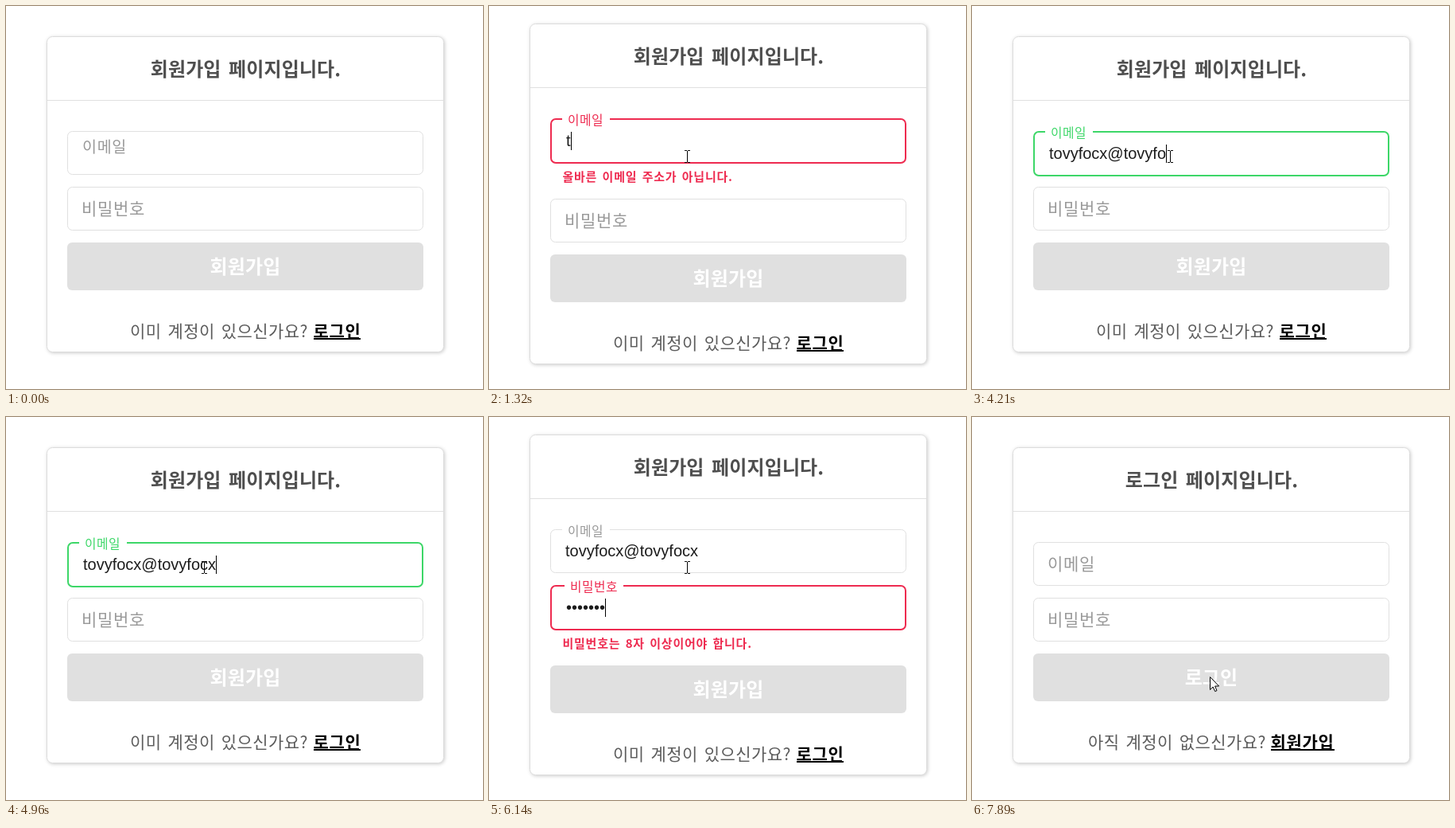
Animation of 600x481 px, one loop 8000 ms. Source, as an HTML page:

```html
<!DOCTYPE html>
<html lang="ko">
<head>
<meta charset="utf-8">
<title>회원가입</title>
<style>
  html, body { margin: 0; width: 100%; height: 100%; overflow: hidden; background: #fff; }
  svg { display: block; width: 100%; height: 100%; }
  text { font-family: "Noto Sans CJK KR", "Noto Sans KR", "Noto Sans CJK JP", "Noto Sans CJK", sans-serif; white-space: pre; }
  .card { fill: #fff; stroke: #dcdcdc; filter: drop-shadow(1px 1px 2px rgba(0, 0, 0, .2)); }
  .big { font-size: 24px; font-weight: 700; letter-spacing: .15px; word-spacing: 2.5px; text-anchor: middle; }
  .mid { font-size: 21px; font-weight: 300; letter-spacing: .7px; word-spacing: 1.6px; fill: #5c5c5c; }
  .ask { letter-spacing: .45px; }
  .link { font-weight: 700; fill: #000; }
  .error { font-size: 15px; font-weight: 700; letter-spacing: .75px; word-spacing: 1.5px; fill: #ee2b50; }
  .value { font: 20px "Liberation Sans", Arial, sans-serif; fill: #1c1c1c; }
  .field { --tone: #e0e0e0; --ink: #999; }
  .box { fill: none; stroke: var(--tone); }
  .label { fill: var(--ink); }
  .notch { fill: #fff; }
  .caret { fill: #000; }
  .good { --tone: #3dd768; --ink: #3dd768; }
  .bad { --tone: #ee2b50; --ink: #ee2b50; }
  .popup rect { fill: #fff; filter: drop-shadow(0 1px 2px rgba(0, 0, 0, .3)); }
  .popup text { font-size: 16.5px; font-weight: 300; letter-spacing: .2px; word-spacing: 1.4px; fill: #4c4c4c; }
</style>
</head>
<body>
<svg viewBox="0 0 600 481">
  <rect class="card" id="card" x="51.5" width="499" rx="7"/>
  <g id="head">
    <text class="big" id="title" x="301.5" y="87.5" fill="#4e4e4e"></text>
    <path d="M52 118.5H550" stroke="#e0e0e0"/>
  </g>
  <g class="field" id="email"></g>
  <g class="field" id="password"></g>
  <g id="foot">
    <rect id="button" x="77" y="297" width="448" height="60" rx="6"/>
    <text class="big" id="action" x="301" y="335.5" fill="#fff"></text>
    <text class="mid ask" id="ask" y="415.5"></text>
    <text class="mid link" id="link" y="415.5"></text>
    <path id="underline" stroke="#000" stroke-width="2"/>
  </g>
  <g class="popup" id="popup">
    <rect x="203" y="294" width="341" height="57" rx="5"/>
    <circle cx="228" cy="322" r="10" fill="#4285f4"/>
    <text x="251.5" y="328">Quobel 계정에 저장된 비밀번호 사용</text>
  </g>
  <path id="beam" d="M246 181.5H249M250 181.5H253M249.5 182V196M246 196.5H249M250 196.5H253" fill="none" stroke="#000"/>
  <path id="arrow" d="M.5.5V16.5L4.2 13 6.7 18.6 9 17.6 6.6 12H11.6Z" fill="#fff" stroke="#000"/>
</svg>
<script>
const LOOP = 8000;
const ADDRESS = 'tovyfocx@tovyfocx';
const FOCUS_PW = 5010, SUBMIT = 7620, POINTER = 7120;

const $ = id => document.getElementById(id);
const clamp = v => Math.max(0, Math.min(1, v));
const every = (start, gap, count) => Array.from({ length: count }, (_, i) => start + gap * i);
const set = (el, attrs) => { for (const k in attrs) el.setAttribute(k, attrs[k]); };
const show = (el, on) => { el.style.display = on ? '' : 'none'; };
const shift = (id, x, y) => set($(id), { transform: `translate(${x} ${y})` });

// keystroke times
const emailKeys = [...every(1310, 127, 8), 2550, ...every(3510, 138, 6), 4620, 4750];
const pwKeys = [5320, 5455, 5575, ...every(5710, 140, 5)];

const pages = {
  join: { title: '회원가입 페이지입니다.', action: '회원가입', ask: '이미 계정이 있으신가요?', link: '로그인', x: 156, from: 387, to: 446 },
  login: { title: '로그인 페이지입니다.', action: '로그인', ask: '아직 계정이 없으신가요?', link: '회원가입', x: 146, from: 376, to: 456 }
};

function makeField(id, name, floatX, notchWidth, message) {
  const root = $(id);
  root.innerHTML = `
    <rect class="box" rx="6"/>
    <g class="float">
      <rect class="notch" x="-9.3" y="-12" width="${notchWidth / .75}" height="24"/>
      <text class="mid label" y="7.5">${name}</text>
    </g>
    <text class="value"></text>
    <rect class="caret" y="17" width="1" height="23"/>
    <text class="error" x="92.5" y="79">${message}</text>`;
  const [box, float, value, caret, error] =
    ['.box', '.float', '.value', '.caret', '.error'].map(s => root.querySelector(s));

  return ({ y, text, focus, bad, lift, blink }) => {
    root.setAttribute('transform', `translate(0 ${y})`);
    root.setAttribute('class', 'field ' + (focus ? bad ? 'bad' : 'good' : ''));
    const w = focus ? 2 : 1;
    set(box, { x: 77 + w / 2, y: w / 2, width: 448 - w, height: 53 + w, 'stroke-width': w });
    const x = 95 + (floatX - 95) * lift;
    set(float, { transform: `translate(${x} ${27.5 - 25.5 * lift}) scale(${1 - lift / 4})` });
    value.textContent = text;
    set(value, { x: 95 + w, y: 33 + w });
    set(caret, { x: Math.round(97 + (text ? value.getComputedTextLength() : 0)) });
    show(caret, focus && blink);
    show(error, bad);
  };
}

const drawEmail = makeField('email', '이메일', 99, 60, '올바른 이메일 주소가 아닙니다.');
const drawPassword = makeField('password', '비밀번호', 102, 74, '비밀번호는 8자 이상이어야 합니다.');

// pointer positions as [time, x, y]
const route = [[POINTER, 262, 222], [7250, 290, 287], [7400, 290, 287], [7500, 299, 326]];

function pointerAt(t) {
  const next = route.findIndex(p => p[0] > t);
  if (next < 0) return route[route.length - 1].slice(1);
  if (next === 0) return route[0].slice(1);
  const a = route[next - 1], b = route[next], k = (t - a[0]) / (b[0] - a[0]);
  return [1, 2].map(i => a[i] + (b[i] - a[i]) * k);
}

function drawPage(page) {
  for (const id of ['title', 'action', 'ask', 'link']) $(id).textContent = page[id];
  set($('ask'), { x: page.x });
  set($('link'), { x: page.from - .5 });
  set($('underline'), { d: `M${page.from} 418H${page.to}` });
}

function render(t) {
  const done = t >= SUBMIT;
  const onPw = t >= FOCUS_PW && !done;
  const typed = keys => done ? 0 : keys.filter(k => k <= t).length;
  const emailLen = typed(emailKeys), pwLen = typed(pwKeys);
  const emailBad = emailLen > 0 && emailLen < 10;
  const pwBad = pwLen > 0 && pwLen < 8;
  const wide = emailBad || pwBad;
  const up = wide ? -16 : 0, down = wide ? 15 : 0;
  const lastKey = Math.max(0, ...[...emailKeys, FOCUS_PW, ...pwKeys].filter(k => k <= t));
  const blink = (t - lastKey) % 1000 < 500;
  const drop = 1 - clamp((t - SUBMIT) / 170);

  drawPage(done ? pages.login : pages.join);
  set($('card'), { y: 38.5 + up, height: wide ? 427 : 396 });
  shift('head', 0, up);
  shift('foot', 0, down);
  $('button').style.fill = pwLen === 8 ? '#3dd768' : '#e0e0e0';

  drawEmail({
    y: 157 + up, text: ADDRESS.slice(0, emailLen), bad: emailBad, blink,
    focus: t >= 65 && t < FOCUS_PW, lift: clamp(.27 + t / 200) * drop
  });
  drawPassword({
    y: 227 + (emailBad ? down : up), text: '•'.repeat(pwLen), bad: pwBad, blink,
    focus: onPw, lift: clamp((t - FOCUS_PW) / 200) * drop
  });

  const fade = 1 - clamp((t - 5320) / 170);
  show($('popup'), t >= 5080 && fade > 0);
  $('popup').style.opacity = fade;

  show($('beam'), t >= 65 && t < POINTER);
  show($('arrow'), t >= POINTER);
  shift('arrow', ...pointerAt(t).map(Math.round));
}

const start = performance.now();
function tick() {
  render((performance.now() - start) % LOOP);
  requestAnimationFrame(tick);
}
tick();
</script>
</body>
</html>
```
